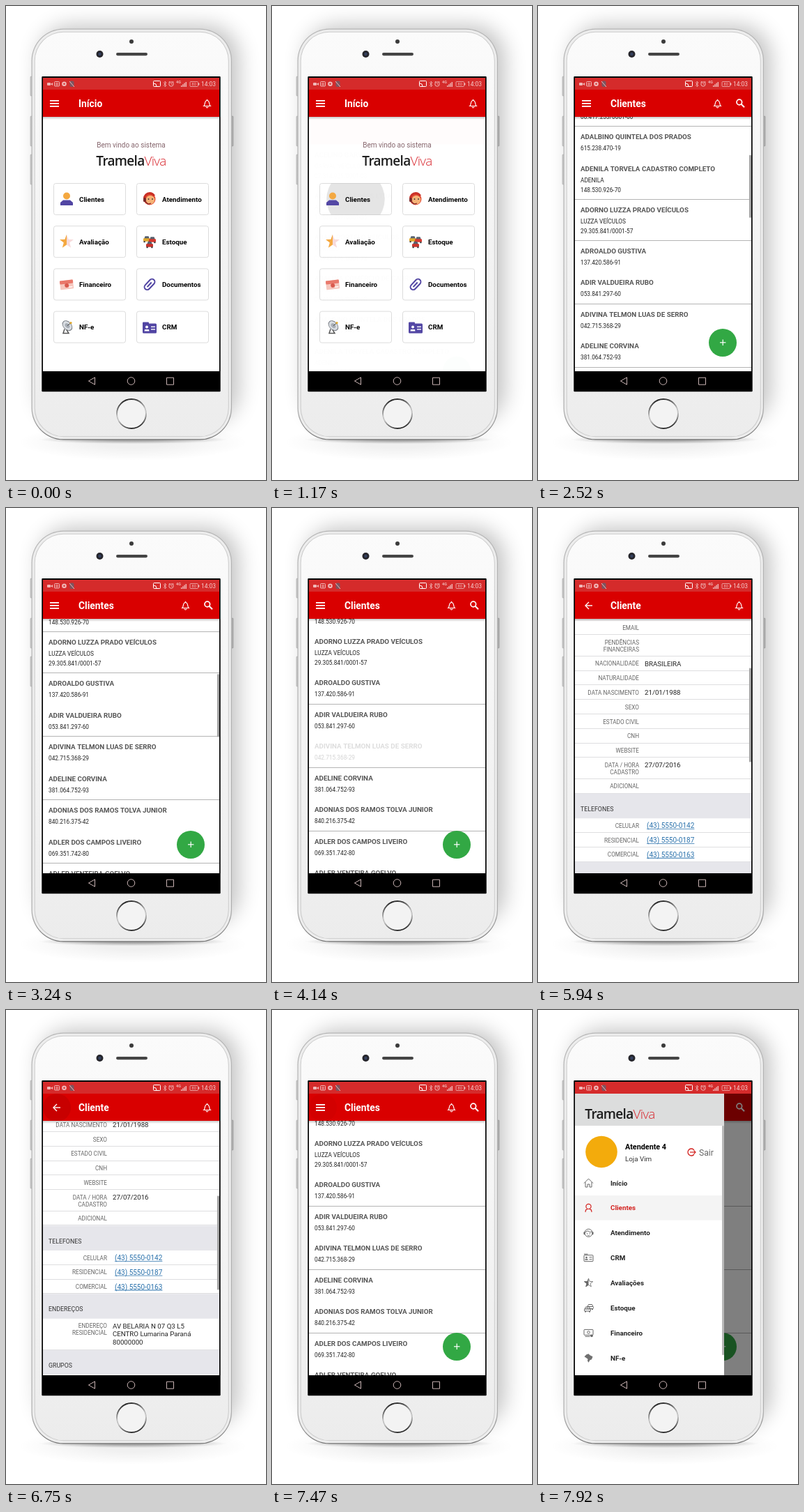
These frames come from a looping animation (373 px wide and 680 px high, 8000 ms). An HTML page with a canvas:

```html
<!DOCTYPE html>
<html lang="pt-BR">
<head>
<meta charset="utf-8">
<title>App demo</title>
<style>
html, body { margin: 0; width: 100%; height: 100%; overflow: hidden; background: #fff; }
canvas { display: block; width: 373px; height: 680px; }
</style>
</head>
<body>
<canvas id="stage"></canvas>
<script>
const W = 373, H = 680, LOOP = 8000;
const canvas = document.getElementById('stage');
const dpr = Math.max(1, window.devicePixelRatio || 1);
canvas.width = W * dpr;
canvas.height = H * dpr;
let g = canvas.getContext('2d');

const RED = '#d90000', PURPLE = '#5145a3', ORANGE = '#f4a840', GREY = '#666';
const TOP = 159, BOTTOM = 524, VIEW = BOTTOM - TOP;

// ---------- helpers ----------
const clamp = v => Math.max(0, Math.min(1, v));
const part = (t, a, b) => clamp((t - a) / (b - a));
const smooth = u => u * u * (3 - 2 * u);
const easeOut = u => 1 - (1 - u) ** 3;

function group(fn, { x = 0, y = 0, alpha = 1, clip, turn = 0 } = {}) {
  if (alpha <= 0) return;
  g.save();
  if (clip) { g.beginPath(); g.rect(...clip); g.clip(); }
  g.translate(x, y);
  g.rotate(turn);
  g.globalAlpha *= alpha;
  fn();
  g.restore();
}
function paint(fill, stroke, w = 1) {
  if (fill) { g.fillStyle = fill; g.fill(); }
  if (stroke) { g.strokeStyle = stroke; g.lineWidth = w; g.stroke(); }
}
function box(x, y, w, h, fill, r = 0, stroke, lw) {
  g.beginPath();
  g.roundRect(x, y, w, h, r);
  paint(fill, stroke, lw);
}
function disc(x, y, r, fill, stroke, lw) {
  g.beginPath();
  g.arc(x, y, r, 0, 7);
  paint(fill, stroke, lw);
}
function shape(pts, fill, stroke, lw, open) {
  g.beginPath();
  for (let i = 0; i < pts.length; i += 2) g.lineTo(pts[i], pts[i + 1]);
  if (!open) g.closePath();
  paint(fill, stroke, lw);
}
const line = (pts, color, w = 1) => shape(pts, null, color, w, true);
function arc(x, y, r, a, b, color, w = 1) {
  g.beginPath();
  g.arc(x, y, r, a, b);
  paint(null, color, w);
}
// y is the middle of the capitals
function text(s, x, y, size, color = '#222', weight = 400, align = 'left') {
  g.font = `${weight} ${size}px Roboto, sans-serif`;
  g.textAlign = align;
  g.fillStyle = color;
  g.fillText(s, x, y + size * 0.36);
}
function wordmark(cx, y) {
  const parts = [['Tramela', 600, '#1c1c1c'], ['Viva', 300, '#d8232a']];
  g.textAlign = 'left';
  if ('letterSpacing' in g) g.letterSpacing = '-0.7px';
  const font = w => g.font = `${w} 19px "Open Sans", sans-serif`;
  const widths = parts.map(([s, w]) => (font(w), g.measureText(s).width));
  let x = cx - (widths[0] + widths[1]) / 2;
  parts.forEach(([s, w, c], i) => {
    font(w);
    g.fillStyle = c;
    g.fillText(s, x, y + 7);
    x += widths[i];
  });
  if ('letterSpacing' in g) g.letterSpacing = '0px';
}
function star(r, from, to) {
  const pts = [];
  for (let i = from; i <= to; i++) {
    const a = -Math.PI / 2 + i * Math.PI / 5, k = i % 2 ? r * 0.42 : r;
    pts.push(Math.cos(a) * k, Math.sin(a) * k);
  }
  return pts;
}

// ---------- phone ----------
function glow(y, r, squash, alpha) {
  const fade = g.createRadialGradient(0, 0, r * 0.3, 0, 0, r);
  fade.addColorStop(0, `rgba(0,0,0,${alpha})`);
  fade.addColorStop(1, 'rgba(0,0,0,0)');
  group(() => { g.scale(1, squash); disc(0, 0, r, fade); }, { x: 182, y });
}
function drawPhone() {
  g.fillStyle = '#fff';
  g.fillRect(0, 0, W, H);
  glow(626, 165, 0.16, 0.06);
  glow(622, 135, 0.045, 0.3);
  for (const [x, y, h] of [[35, 101, 28], [35, 158, 43], [35, 213, 43], [323.5, 158, 43]])
    box(x, y, 2.5, h, '#d2d2d2', 1, '#a5a5a5', 0.5);
  g.save();
  g.shadowColor = 'rgba(0,0,0,.24)';
  g.shadowBlur = 30 * dpr;
  g.shadowOffsetX = 11 * dpr;
  g.shadowOffsetY = -12 * dpr;
  box(37, 40, 286, 570, '#d9d9d9', 46);
  g.restore();
  const face = g.createLinearGradient(0, 36, 0, 620);
  face.addColorStop(0, '#fbfbfb');
  face.addColorStop(1, '#ececec');
  const rim = g.createLinearGradient(0, 33, 0, 622);
  rim.addColorStop(0, '#b4b4b4');
  rim.addColorStop(0.93, '#adadad');
  rim.addColorStop(1, '#6f6f6f');
  const layer = (d, fill) => box(36.5 + d, 32.5 + d, 287.5 - 2 * d, 590 - 2 * d, fill, 46 - d);
  layer(0, rim);
  layer(1.2, '#ededed');
  layer(4.2, '#cbcbcb');
  layer(5.2, face);
  disc(180, 51, 3, '#3b3b3b');
  disc(134.5, 69, 5, '#25252b');
  disc(134.5, 69, 2.2, '#34405e');
  box(158, 67, 45, 4.2, '#444', 2.1);
  const ring = g.createLinearGradient(174, 564, 186, 606);
  ring.addColorStop(0, '#222');
  ring.addColorStop(0.45, '#c4c4c4');
  ring.addColorStop(0.6, '#c4c4c4');
  ring.addColorStop(1, '#222');
  disc(180, 585, 22.5, '#fff');
  disc(180, 585, 21, '#f3f3f3', ring, 2);
  box(51.3, 101, 256.4, 452.3, '#000', 1);
}

function statusBar() {
  const c = '#f0b9b9';
  box(53, 103, 253, 17.5, '#d52b2b');
  box(59, 110, 5, 4, c, 1);
  shape([64, 112, 67, 110, 67, 114], c);
  box(69.5, 108.5, 7, 6.5, null, 1, c);
  line([71, 111, 75, 111], c);
  line([71, 113, 75, 113], c);
  disc(83.5, 111.8, 3.3, c);
  disc(83.5, 111.8, 1.2, '#d52b2b');
  box(91.5, 107.5, 6, 8.5, '#7c5560', 2);
  line([91, 108, 98, 116], c);
  box(211.5, 107.5, 10, 8, null, 1, '#fff');
  arc(212, 115, 4, -1.57, 0, '#fff');
  line([226, 109.5, 230, 114, 228, 116, 228, 108, 230, 110, 226, 114.5], c, 0.8);
  disc(237, 112, 3.2, null, c);
  line([237, 110, 237, 112, 238.5, 112.6], c, 0.8);
  line([233.5, 109.5, 235, 108], c);
  line([239, 108, 240.5, 109.5], c);
  text('4G', 244, 109.5, 5.5, c, 700);
  for (let i = 0; i < 4; i++) box(251 + i * 2.2, 114 - i * 1.7, 1.4, 2 + i * 1.7, c);
  box(264, 108.5, 11.5, 7, null, 1, c, 0.8);
  text('80', 269.7, 112, 5.5, c, 400, 'center');
  box(276, 110.5, 1.3, 3, c);
  text('14:03', 280, 112, 8.4, '#f6cccc');
}

function navBar() {
  const c = '#c9b3b3';
  box(53, BOTTOM, 253, 28.5, '#000');
  shape([118.5, 538, 127.5, 532.8, 127.5, 543.2], null, c);
  disc(179.5, 538, 5.3, null, c);
  box(230.5, 533.2, 10, 10, null, 0, c);
}

// ---------- toolbar ----------
function bell(x) {
  g.beginPath();
  g.moveTo(x - 4.6, 143.5);
  g.bezierCurveTo(x - 2.6, 142, x - 4, 135.5, x, 135.5);
  g.bezierCurveTo(x + 4, 135.5, x + 2.6, 142, x + 4.6, 143.5);
  g.closePath();
  paint(null, '#fff', 1.2);
  line([x, 134, x, 135.5], '#fff', 1.5);
  arc(x, 144.6, 1.4, 0, Math.PI, '#fff', 1.2);
}
function toolbar(title, { back, search, press = 0 } = {}) {
  const shade = g.createLinearGradient(0, TOP, 0, TOP + 4);
  shade.addColorStop(0, 'rgba(0,0,0,.22)');
  shade.addColorStop(1, 'rgba(0,0,0,0)');
  box(53, TOP, 253, 4, shade);
  box(53, 120, 253, 39, RED);
  group(() => disc(73, 140, 20, '#000'), { alpha: press * 0.08, clip: [53, 120, 253, 39] });
  if (back) {
    line([78, 140, 68, 140], '#fff', 1.4);
    line([73, 135, 68, 140, 73, 145], '#fff', 1.4);
  } else {
    for (let i = -1; i < 2; i++) box(63, 139 + i * 4, 13, 1.8, '#fff');
  }
  text(title, 104, 140.5, 13.8, '#fff', 700);
  bell(search ? 257.5 : 288.5);
  if (search) {
    disc(288.8, 138, 3.8, null, '#fff', 1.7);
    line([291.5, 140.8, 296, 145.2], '#fff', 2);
  }
}

// ---------- home ----------
function car(x, y, c) {
  shape([x - 4, y, x - 2.5, y - 4, x + 2.5, y - 4, x + 4, y], '#57606e');
  box(x - 5, y - 1, 10, 4.5, c, 1);
  box(x - 4.5, y + 3, 2.2, 2, '#333');
  box(x + 2.3, y + 3, 2.2, 2, '#333');
}
const cardIcons = [
  () => {
    disc(0, -4.5, 5, ORANGE);
    shape([-9, 9, -9, 5, -5, 1.5, 5, 1.5, 9, 5, 9, 9], PURPLE);
  },
  () => {
    disc(0, 0, 8.5, '#e2452f');
    disc(1, 1, 6.3, '#f5b276');
    arc(0, -1, 7.5, Math.PI, 5.8, '#c92f25', 3);
    box(-9, -2, 4, 6, '#7a2a2a', 1.5);
    disc(-1.5, 0, 0.9, '#333');
    disc(4, 0, 0.9, '#333');
    line([-6, 4, -2, 7, 2, 6], '#7a2a2a', 1.2);
  },
  () => {
    shape(star(10.5, 0, 5), '#f7dbdb');
    shape(star(10.5, 5, 10), ORANGE);
  },
  () => { car(-4, -4, '#e0a92d'); car(4, -3, '#d5382e'); car(0, 4, '#c8322b'); },
  () => group(() => {
    box(-9.5, -6, 19, 13, '#f6c6bd', 1);
    box(-9.5, -6, 19, 5, '#e9776a', 1);
    disc(0, 1.5, 3, '#d9584c');
    box(3, 3.5, 5, 1.4, '#fff');
  }, { turn: -0.12 }),
  () => group(() => {
    box(-4, -9, 8, 18, null, 4, PURPLE, 2);
    line([0, 5, 0, -4], PURPLE, 2);
  }, { turn: 0.75 }),
  () => {
    group(() => {
      g.scale(1, 0.7);
      disc(0, 0, 8, '#d9dde2', '#70757d', 1);
      disc(0, 0, 4, '#a7adb5');
    }, { turn: 0.8, x: 1, y: -2 });
    line([1, -2, 6, -6], '#444', 1);
    disc(6, -6, 1.6, '#e0a92d');
    line([-3, 3, -5, 9, 3, 9, 0, 4], '#555', 1.5);
  },
  () => {
    box(-10, -7, 9, 5, PURPLE, 1);
    box(-10, -5, 20, 14, PURPLE, 1.5);
    disc(-4, 0, 2, '#fff');
    shape([-7.5, 6, -7, 3.5, -1, 3.5, -0.5, 6], '#fff');
    box(2, -1, 6, 1.4, '#fff');
    box(2, 2.5, 6, 1.4, '#fff');
  }
];
const cardNames = ['Clientes', 'Atendimento', 'Avaliação', 'Estoque', 'Financeiro', 'Documentos', 'NF-e', 'CRM'];

function home(t) {
  box(53, TOP, 253, VIEW, '#fff');
  text('Bem vindo ao sistema', 179.5, 199.5, 10, '#85656c', 400, 'center');
  wordmark(179.5, 222);
  cardNames.forEach((name, i) => {
    const x = 68.5 + (i % 2) * 119, y = 254.5 + (i >> 1) * 61.2;
    box(x, y, 103, 45, '#fff', 3, '#dcdcdc');
    if (!i) {
      const u = part(t, 990, 1250);
      group(() => disc(120, 277, 60 * u, '#000'), { alpha: u ? 0.1 : 0, clip: [x, y, 103, 45] });
    }
    group(cardIcons[i], { x: x + 18.5, y: y + 22.5 });
    text(name, x + 36.5, y + 22.8, 9.8, '#000', 700);
  });
  toolbar('Início');
}

// ---------- client list ----------
const clients = [
  'ACELINO GARVAL VEÍCULOS|GARVAL VEÍCULOS|07.314.925/0001-08',
  'ACRISIO MOTORES LTDA|ACRISIO MOTORES|11.620.487/0001-35',
  'ADAIR PORTELO VEÍCULOS|PORTELO|05.943.176/0001-72',
  'ADALINA COMÉRCIO DE CARROS|ADALINA|08.417.253/0001-60',
  'ADALBINO QUINTELA DOS PRADOS|615.238.470-19',
  'ADENILA TORVELA CADASTRO COMPLETO|ADENILA|148.530.926-70',
  'ADORNO LUZZA PRADO VEÍCULOS|LUZZA VEÍCULOS|29.305.841/0001-57',
  'ADROALDO GUSTIVA|137.420.586-91',
  'ADIR VALDUEIRA RUBO|053.841.297-60',
  'ADIVINA TELMON LUAS DE SERRO|042.715.368-29',
  'ADELINE CORVINA|381.064.752-93',
  'ADONIAS DOS RAMOS TOLVA JUNIOR|840.216.375-42',
  'ADLER DOS CAMPOS LIVEIRO|069.351.742-80',
  'ADLER VENTEIRA GOELVO|093.572.816-44'
].map(s => s.split('|'));
const PICKED = 9;

function scrollBar(scroll, total, alpha) {
  group(() => box(303, TOP + scroll / total * VIEW, 3, VIEW * VIEW / total, '#a3a3a3', 1), { alpha });
}

function list(t) {
  box(53, TOP, 253, VIEW, '#fff');
  const scroll = 323 * (1 - (1 - part(t, 2160, 3600)) ** 4.04);
  const press = part(t, 3870, 4100) * (1 - part(t, 4500, 4600));
  group(() => {
    let y = TOP - scroll, phase = 0;
    clients.forEach((lines, i) => {
      const tall = lines.length > 2;
      group(() => {
        text(lines[0], 61, y + 15, 9.8, '#555', 700);
        text(lines[1], 61, y + 31.6, 8.3);
        if (tall) text(lines[2], 61, y + 45.6, 8.3);
      }, { alpha: i === PICKED ? 1 - 0.8 * press : 1 });
      y += tall ? 59 : 45.5;
      phase += tall ? 0.3 : 1;
      // hairlines only land on a pixel every second row
      const k = phase - 2.4 - Math.round(scroll - 222);
      if (((k % 2) + 2) % 2 < 1) box(53, Math.floor(y), 253, 1, '#b4b4b4');
    });
  }, { clip: [53, TOP, 253, VIEW] });
  scrollBar(scroll, 1480, part(t, 2100, 2200) * (1 - part(t, 3600, 3900)));
  disc(265, 483, 20, '#32a844');
  box(261, 482.2, 8.4, 1.2, '#fff');
  box(264.6, 478.6, 1.2, 8.4, '#fff');
  toolbar('Clientes', { search: true, press: part(t, 7440, 7530) });
}

// ---------- client detail: "#" opens a section, "/" breaks a line, "|" is a slash ----------
const person = 'ADIVINA TELMON LUAS DE/SERRO';
const rows = [
  ['#DADOS BÁSICOS'], ['COD', '467003'], ['PESSOA', 'Física'], ['NOME COMPLETO', person],
  ['APELIDO', person], ['CPF', '04271536829'], ['RG', '7.218.504-3'], ['EMAIL'],
  ['PENDÊNCIAS/FINANCEIRAS'], ['NACIONALIDADE', 'BRASILEIRA'], ['NATURALIDADE'],
  ['DATA NASCIMENTO', '21|01|1988'], ['SEXO'], ['ESTADO CIVIL'], ['CNH'], ['WEBSITE'],
  ['DATA | HORA/CADASTRO', '27|07|2016'], ['ADICIONAL'],
  ['#TELEFONES'], ['CELULAR', '(43) 5550-0142'], ['RESIDENCIAL', '(43) 5550-0187'],
  ['COMERCIAL', '(43) 5550-0163'],
  ['#ENDEREÇOS'], ['ENDEREÇO/RESIDENCIAL', 'AV BELARIA N 07 Q3 L5/CENTRO Lumarina Paraná/80000000'],
  ['#GRUPOS']
];
const split = s => (s || '').split('/').map(p => p.replace(/\|/g, '/'));

function detail(t) {
  box(53, TOP, 253, VIEW, '#fff');
  const scroll = 291 * smooth(part(t, 5130, 6470));
  group(() => {
    let y = TOP - scroll;
    rows.forEach(([label, value], i) => {
      if (label[0] === '#') {
        const h = i ? 35.5 : 44;
        box(53, y, 253, h, '#e6e6eb');
        text(label.slice(1), 61, y + h - 13.5, 8.8, '#333');
        y += h;
        return;
      }
      const left = split(label), right = split(value);
      left.forEach((s, n) => text(s, 145, y + 10.7 + n * 9.8, 8.2, GREY, 400, 'right'));
      right.forEach((s, n) => {
        if (s[0] === '(') {
          text(s, 156, y + 10.4, 10, '#2b72ac');
          box(156, y + 15, g.measureText(s).width, 0.9, '#2b72ac');
        } else text(s, 153, y + 10.4 + n * 11.6, 9.7);
      });
      y += Math.max(left.length > 1 ? 30.5 : 20.8, [0, 20.8, 33, 45][right.length]);
      box(53, Math.round(y) - 1, 253, 1, '#dedee0');
    });
  }, { clip: [53, TOP, 253, VIEW] });
  scrollBar(scroll, 987, 1);
  toolbar('Cliente', { back: true, press: part(t, 6600, 6720) });
}

// ---------- side menu ----------
const outlineCar = (x, y) => {
  shape([x - 4, y, x - 2.5, y - 3, x + 2.5, y - 3, x + 4, y], null, GREY);
  box(x - 4.5, y, 9, 3, '#fff', 1, GREY);
  box(x - 4, y + 3, 2, 1.5, GREY);
  box(x + 2, y + 3, 2, 1.5, GREY);
};
const menuItems = [
  ['Início', () => {
    line([-6.5, 0.5, 0, -6, 6.5, 0.5], GREY);
    line([-4.5, -1, -4.5, 6, -1.5, 6, -1.5, 2, 1.5, 2, 1.5, 6, 4.5, 6, 4.5, -1], GREY);
  }],
  ['Clientes', () => {
    disc(0, -2, 3.6, null, '#d3221f', 1.2);
    line([-4.5, 6, -4, 3, -1.5, 1.5], '#d3221f', 1.2);
    line([4.5, 6, 4, 3, 1.5, 1.5], '#d3221f', 1.2);
  }],
  ['Atendimento', () => {
    disc(0, 0, 5.6, null, GREY);
    line([-5, -1, -1, -3, 2, -1, 5, -2], GREY);
    box(-7, -1.5, 2, 4, GREY, 1);
    box(5, -1.5, 2, 4, GREY, 1);
    disc(-2, 1, 0.7, GREY);
    disc(2, 1, 0.7, GREY);
    arc(0, 2, 2, 0.4, 2.7, GREY, 0.8);
  }],
  ['CRM', () => {
    box(-6.5, -4, 13, 9, null, 1, GREY);
    line([-6.5, -5.5, -1, -5.5], GREY);
    disc(-3, -0.6, 1.3, GREY);
    box(-5, 1.4, 4, 1.6, GREY);
    line([1, -1, 5, -1], GREY);
    line([1, 2, 5, 2], GREY);
  }],
  ['Avaliações', () => {
    shape(star(6.5, 0, 10), null, GREY, 0.8);
    shape(star(6.8, 5, 10), GREY);
  }],
  ['Estoque', () => { outlineCar(2.5, -2); outlineCar(-1.5, 1.5); }],
  ['Financeiro', () => {
    box(-6.5, -5, 13, 8, null, 1, GREY);
    disc(0, -1, 1.8, null, GREY);
    line([-5, 5, 2, 5], GREY);
    disc(4.5, 4, 1.8, GREY);
  }],
  ['NF-e', () => shape([-6, -2, -3, -5, 0, -6, 2, -4, 6, -2, 4.5, 2, 2, 3, 0, 6.5, -1.5, 4, -1, 1.5, -3, 0], '#707070')]
];

function menu() {
  box(53, 120, 214, 404, '#fff');
  box(53, 120, 214, 46, '#dcdddd');
  wordmark(117.5, 149);
  disc(91, 203.5, 22.8, '#f3ab0c');
  text('Atendente 4', 125, 196.5, 10.8, '#000', 700);
  text('Loja Vim', 125, 213.5, 9.8, '#333');
  arc(220, 204, 5, 0.7, 5.6, '#d3221f', 1.3);
  line([218, 204, 226, 204], '#d3221f', 1.2);
  line([223.5, 201.5, 226, 204, 223.5, 206.5], '#d3221f', 1.2);
  text('Sair', 231, 204.5, 12.2, GREY);
  menuItems.forEach(([name, icon], i) => {
    const y = 248 + i * 35.9, on = i === 1;
    if (on) box(53, y - 18, 214, 35.5, '#f4f4f4');
    group(icon, { x: 72.5, y });
    text(name, 104, y, 9.8, on ? '#d3221f' : '#222', 700);
  });
  box(264, 166, 3, 329, '#b9b9b9', 1);
}

// ---------- timeline ----------
const screenClip = [53, 120, 253, 404];
const backdrop = document.createElement('canvas');
backdrop.width = canvas.width;
backdrop.height = canvas.height;
const front = g;
g = backdrop.getContext('2d');
g.scale(dpr, dpr);
drawPhone();
statusBar();
navBar();
g = front;

function draw(t) {
  g.setTransform(1, 0, 0, 1, 0, 0);
  g.drawImage(backdrop, 0, 0);
  g.scale(dpr, dpr);
  const toList = easeOut(part(t, 1170, 1450));
  const toDetail = easeOut(part(t, 4250, 4580));
  const leave = part(t, 6790, 7020) ** 2;
  const open = easeOut(part(t, 7530, 7870));
  group(() => {
    if (toList < 1) home(t);
    if (toDetail < 1 || leave > 0)
      group(() => list(t), { y: 40 * (1 - toList), alpha: toList });
    const shown = toDetail * (1 - leave);
    group(() => detail(t), { y: 40 * (1 - shown), alpha: shown });
    if (open > 0) {
      group(() => box(53, 120, 253, 404, '#000'), { alpha: 0.5 * open });
      group(menu, { x: -214 * (1 - open) });
    }
  }, { clip: screenClip });
}

const start = performance.now();
function tick() {
  draw((performance.now() - start) % LOOP);
  requestAnimationFrame(tick);
}
tick();
</script>
</body>
</html>
```
